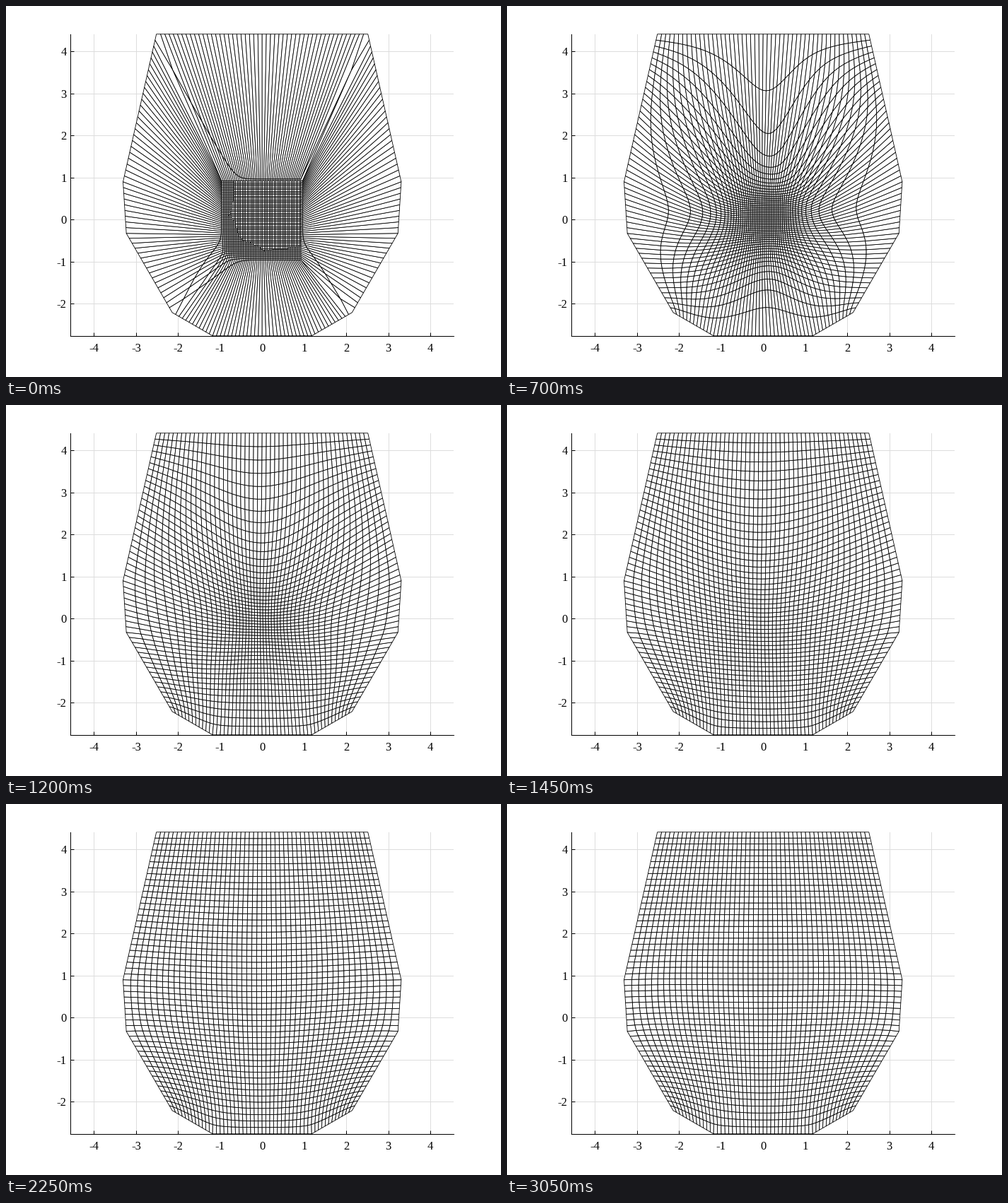
A matplotlib script for the animation above (3100 ms loop, 700x525 px).

```python
import numpy as np
import matplotlib.pyplot as plt
from matplotlib.animation import FuncAnimation
from matplotlib.collections import PolyCollection

N = 50            # cells per side
W = N + 1         # nodes per side
FRAMES = 62
OMEGA = 1.25      # over-relaxation

plt.rcParams["font.family"] = "Liberation Serif"


def polyline(points, counts):
    """Nodes along a polyline, with a given number of cells per segment."""
    parts = [np.linspace(a, b, n, endpoint=False)
             for a, b, n in zip(points, points[1:], counts)]
    return np.append(np.concatenate(parts), points[-1])


def sweeps(frame):
    """Relaxation sweeps done by a frame; the pace picks up steadily."""
    return 1 + frame + frame * frame // 5


def start_grid():
    s = np.linspace(-1, 1, W)
    z = s[None, :] + 1j * s[:, None]
    left = polyline([-2.138 - 2.215j, -3.23 - 0.33j, -3.308 + 0.897j,
                     -2.515 + 4.41j], [16, 9, 25])
    bottom = polyline([-2.138 - 2.215j, -1.178 - 2.77j, 1.178 - 2.77j,
                       2.138 - 2.215j], [12, 26, 12])
    z[:, 0] = left
    z[:, -1] = -left.conj()
    z[0] = bottom
    z[-1] = np.linspace(left[-1], -left[-1].conj(), W)
    return z.ravel()


def relax():
    """Successive over-relaxation of the Winslow equations.

    Node (i, j) in sweep s is due at step i + 2j + 4s, so successive
    sweeps run through the grid as one pipeline.
    """
    z = start_grid()
    out = np.tile(z, (FRAMES, 1))
    i, j = np.meshgrid(np.arange(1, N), np.arange(1, N))
    node = (j * W + i).ravel()
    delay = (i + 2 * j - 3).ravel()
    groups = [(node[delay % 4 == c], delay[delay % 4 == c]) for c in range(4)]

    total, last = sweeps(FRAMES - 1), delay.max()
    slot = np.full(total + last, -1)
    slot[[sweeps(f) - 1 for f in range(FRAMES)]] = np.arange(FRAMES)

    for t in range(4 * total + last + 1):
        k, lag = groups[t % 4]
        if t < last:
            k, lag = k[lag <= t], lag[lag <= t]
        l, r, d, u = z[k - 1], z[k + 1], z[k - W], z[k + W]
        xi, eta = (r - l) / 2, (u - d) / 2
        alpha, gamma = abs(eta) ** 2, abs(xi) ** 2
        beta = (xi * eta.conj()).real
        cross = z[k + W + 1] - z[k + W - 1] - z[k - W + 1] + z[k - W - 1]
        goal = ((alpha * (l + r) + gamma * (u + d) - beta / 2 * cross)
                / (2 * (alpha + gamma)))
        z[k] += OMEGA * (goal - z[k])
        f = slot[(t - lag) // 4]
        hit = f >= 0
        if hit.any():
            out[f[hit], k[hit]] = z[k[hit]]
    return out.reshape(FRAMES, W, W)


def quads(z):
    corners = np.stack([z[:-1, :-1], z[:-1, 1:], z[1:, 1:], z[1:, :-1]], -1)
    corners = corners.reshape(-1, 4)
    return np.stack([corners.real, corners.imag], -1)


grids = relax()

fig = plt.figure(figsize=(7, 5.25), dpi=100, facecolor="white")
ax = fig.add_axes([91.2 / 700, 58.2 / 525, 542 / 700, 427 / 525])
ax.set_xlim(-4.558, 4.558)
ax.set_ylim(-2.77, 4.41)
ax.set_axisbelow(True)
ax.grid(color="#dcdcdc", linewidth=0.7)
for side in ("top", "right"):
    ax.spines[side].set_visible(False)
for side in ("left", "bottom"):
    ax.spines[side].set_linewidth(0.72)
xs, ys = range(-4, 5), range(-2, 5)
ax.set_xticks(xs, [str(v) for v in xs])
ax.set_yticks(ys, [str(v) for v in ys])
ax.tick_params(direction="in", length=3.6, width=0.72, labelsize=12)
ax.tick_params(axis="x", pad=7)
ax.tick_params(axis="y", pad=4)

mesh = PolyCollection(quads(grids[0]), facecolors="white", edgecolors="black",
                      linewidths=0.6, clip_on=False, zorder=2)
ax.add_collection(mesh, autolim=False)


def draw(frame):
    mesh.set_verts(quads(grids[frame]))
    return [mesh]


anim = FuncAnimation(fig, draw, frames=FRAMES, interval=50, repeat=True,
                     repeat_delay=0, blit=False)
plt.show()
```
